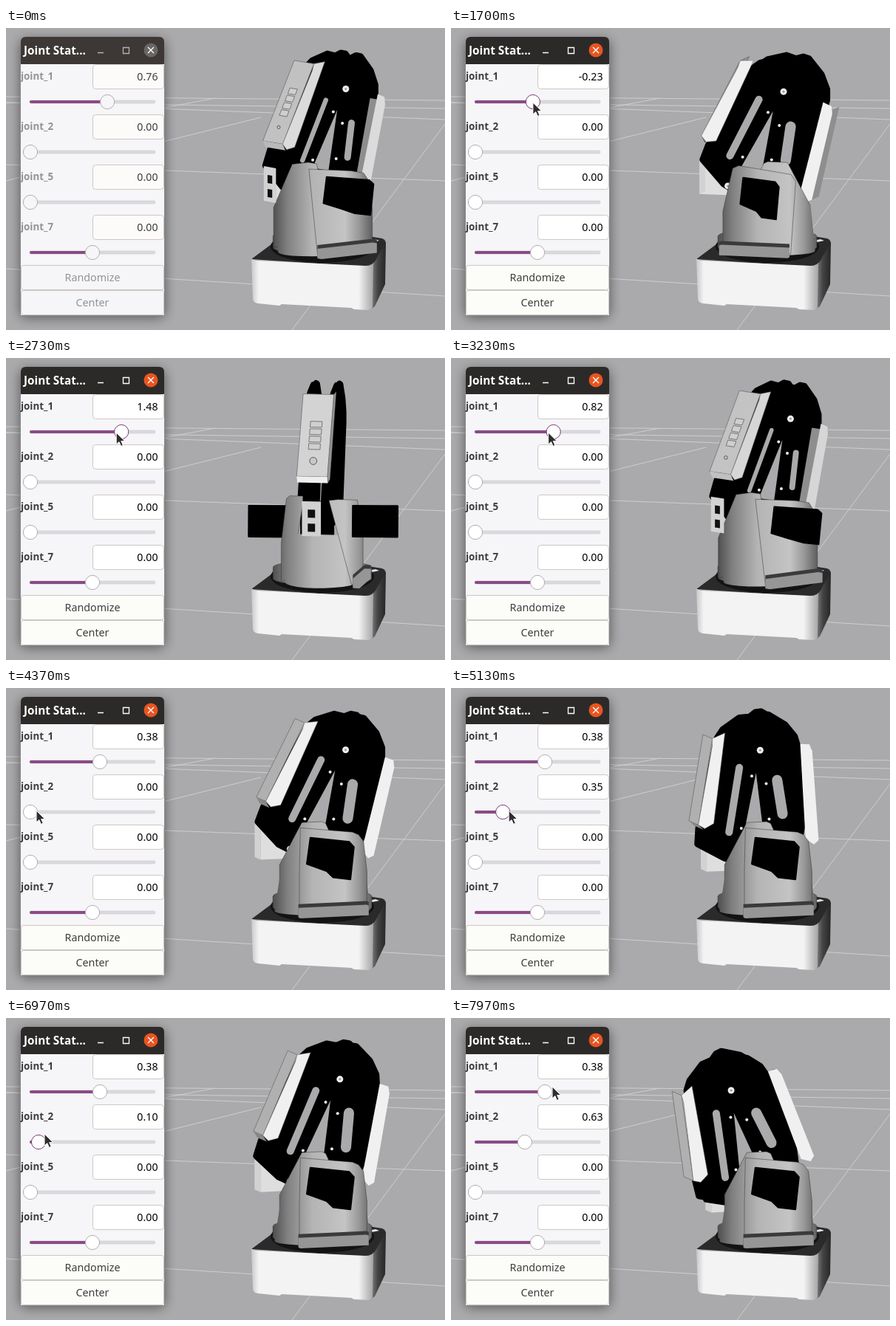
An HTML page for the animation above (8 s loop, 594 px wide and 409 px high).

```html
<!DOCTYPE html>
<html>
<head>
<meta charset="utf-8">
<style>
html, body { margin: 0; width: 100%; height: 100%; overflow: hidden; background: #aaa9ab; }
svg { display: block; width: 594px; height: 409px; }
text { font-family: "Noto Sans", "Open Sans", sans-serif; }
</style>
</head>
<body>
<svg id="stage" viewBox="0 0 594 409">
  <defs>
    <linearGradient id="metal" gradientUnits="userSpaceOnUse" x1="360" x2="497">
      <stop offset="0" stop-color="#4c4c4c"/><stop offset=".15" stop-color="#808080"/>
      <stop offset=".4" stop-color="#b4b4b4"/><stop offset=".72" stop-color="#c4c4c4"/>
      <stop offset=".86" stop-color="#989898"/><stop offset="1" stop-color="#5a5a5a"/>
    </linearGradient>
    <linearGradient id="front">
      <stop offset="0" stop-color="#c8c8c8"/><stop offset=".06" stop-color="#f3f3f3"/>
      <stop offset=".88" stop-color="#f3f3f3"/><stop offset="1" stop-color="#a4a4a4"/>
    </linearGradient>
    <linearGradient id="side">
      <stop offset="0" stop-color="#8e8e8e"/><stop offset=".5" stop-color="#444"/><stop offset="1" stop-color="#262626"/>
    </linearGradient>
    <filter id="blur" x="-20%" y="-20%" width="140%" height="140%"><feGaussianBlur stdDeviation="8"/></filter>
  </defs>
</svg>
<script>
const LOOP = 8000, FLOOR = '#aaa9ab';
const stage = document.getElementById('stage');

function add(parent, tag, attrs, text) {
  const el = document.createElementNS('http://www.w3.org/2000/svg', tag);
  set(el, attrs);
  if (text) el.textContent = text;
  parent.appendChild(el);
  return el;
}
function set(el, attrs) {
  for (const k in attrs) el.setAttribute(k, attrs[k]);
}
const lerp = (a, b, u) => a + (b - a) * u;
const ramp = (t, from, to) => Math.max(0, Math.min(1, (t - from) / (to - from)));
const gray = g => `rgb(${[g, g, g].map(Math.round)})`;

// ---- Motion ----
const JOINT1 = [[1270, .76], [1700, -.23], [1880, -.5], [2100, -.5], [2730, 1.48], [2930, 1.48], [3430, .38]];
const JOINT2 = [[4370, 0], [4770, .2], [5000, .2], [5130, .35], [5450, .55], [5830, .35],
  [6070, .07], [6140, 0], [6270, .07], [6770, .07], [6900, 0], [7330, .63]];

function track(keys, t) {
  const i = Math.max(1, keys.findIndex(k => k[0] >= t)), last = keys[keys.length - 1];
  if (t >= last[0]) return last[1];
  const [t0, a] = keys[i - 1], [t1, b] = keys[i];
  return lerp(a, b, ramp(t, t0, t1));
}
const knob1 = v => 117 + v * 26.5;
const knob2 = v => 33 + v * 106;

// The pointer holds a knob while dragging and travels between knobs otherwise
function pointerAt(t, x1, x2) {
  const grip1 = [x1 - 7 * ramp(t, 2000, 2150), 101];
  const grip2 = [x2 + 8, 166 - 9 * ramp(t, 5130, 5830)];
  const move = (a, b, u) => [lerp(a[0], b[0], u), lerp(a[1], b[1], u)];
  if (t < 1270) return move([160, 386], grip1, ramp(t, 430, 900));
  if (t < 4170) {
    const u = ramp(t, 3670, 4170), [x, y] = move(grip1, grip2, u);
    return [x, y + 220 * Math.sin(Math.PI * u)];
  }
  return move(grip2, [137, 93], ramp(t, 7670, 7970));
}

// ---- Floor and base ----
add(stage, 'rect', { width: 594, height: 409, fill: FLOOR });
add(stage, 'path', {
  d: 'M0 93L594 98M0 101L594 109M0 101L594 124M0 185L594 207M0 326L594 363M387 409L594 130M0 207L345 121M214 108L283 95',
  stroke: '#cfcecf'
});
add(stage, 'path', { d: 'M332 313L371 284L478 280L509 285Q514 287 514 292L498 324Z', fill: '#2b2a2b' });
add(stage, 'path', { d: 'M492 321Q499 319 503 309L514 290L513 347L499 377L492 382Z', fill: 'url(#side)' });
add(stage, 'path', {
  d: 'M332 312Q333 314 340 315L486 322Q495 322 497 318L496 378Q495 382 490 382L471 381L467 379L373 374L370 376L341 373Q334 372 334 366Z',
  fill: 'url(#front)'
});
add(stage, 'path', { d: 'M490 288L500 286L505 288L495 290Z', fill: '#e4e4e4' });
add(stage, 'ellipse', { cx: 428, cy: 296, rx: 70, ry: 22, fill: '#131313' });
const robot = add(stage, 'g');

// ---- Robot: side profiles given depth, turned and projected ----
const PIVOT = [2, 220];
const ARM = [[-16, 55], [-5, 47], [22, 40], [36, 44], [46, 41], [54, 43], [72, 64], [80, 84], [80, 98],
  [55, 198], [42, 222], [-42, 222], [-57, 214], [-87, 182], [-79, 162]];
const GAP = [[13, 112], [-45, 212], [-6, 212]];
const FRONT_COVER = [[-13, 44], [-66, 155], [-80, 157], [-87, 149], [-35, 54], [-32, 45]];
const BACK_COVER = [[84, 97], [96, 102], [97, 112], [68, 230], [60, 233], [51, 222]];
const MOTOR = [[-.85, -1], [.8, -.8], [1, -.55], [.85, 1], [.1, .9], [-.15, .6], [-1, .25]];
const rect = (x0, y0, x1, y1) => [[x0, y0], [x1, y0], [x1, y1], [x0, y1]];

function hull(points) {
  const sorted = [...points].sort((a, b) => a[0] - b[0] || a[1] - b[1]);
  const chain = list => {
    const out = [];
    for (const p of list) {
      while (out.length > 1) {
        const [a, b] = out.slice(-2);
        if ((b[0] - a[0]) * (p[1] - a[1]) > (b[1] - a[1]) * (p[0] - a[0])) break;
        out.pop();
      }
      out.push(p);
    }
    return out.slice(0, -1);
  };
  return [...chain(sorted), ...chain(sorted.reverse())];
}
const shape = (pts, fill, attrs = '') =>
  `<polygon points="${pts.map(p => p.map(n => n.toFixed(1))).join(' ')}" fill="${fill}" stroke-linejoin="round" ${attrs}/>`;
const outline = (color, width) => `stroke="${color}" stroke-width="${width}"`;

function drawRobot(yaw, pitch) {
  const s = Math.sin(yaw - .07), c = Math.cos(yaw - .07);
  const sp = Math.sin(pitch), cp = Math.cos(pitch);
  const sideOn = c > .4;

  const at = (x, y, z) => [428 + x * c + z * s, y + .14 * ((z - 16) * c - x * s)];
  const bend = ([x, y]) => {
    const dx = x - PIVOT[0], dy = y - PIVOT[1];
    return [PIVOT[0] + dx * cp + dy * sp, PIVOT[1] - dx * sp + dy * cp];
  };
  const side = (profile, z) => profile.map(([x, y]) => at(x, y, z));
  const solid = (profile, z0, z1) => [...side(profile, z0), ...side(profile, z1)];
  const strip = (a, b, z) => [at(...a, -z), at(...a, z), at(...b, z), at(...b, -z)];
  const armStrip = (a, b, z) => strip(bend(a), bend(b), z);
  const armSide = (profile, z) => side(profile.map(bend), z);
  const ring = (rx, y, rz) => Array.from({ length: 24 }, (_, i) => {
    const a = i * Math.PI / 12;
    return at(rx * Math.cos(a), y, rz * Math.sin(a));
  });
  const dot = (x, y, z, r, fill, attrs = '') => {
    const [cx, cy] = at(...bend([x, y]), z);
    return `<circle cx="${cx}" cy="${cy}" r="${r}" fill="${fill}" ${attrs}/>`;
  };
  const slot = (a, b, w) => {
    const [p, q] = armSide([a, b], 16);
    return `<path d="M${p}L${q}" stroke="${FLOOR}" stroke-width="${w * (2 * c - .9)}" stroke-linecap="round"/>`;
  };

  // Shoulder motors slide out to both sides as the arm turns to the front
  const slide = 73 * Math.sign(s) * Math.abs(s) ** 1.6;
  const motor = (dir, w) => shape(MOTOR.map(([x, y]) => [
    428 + dir * slide + w * lerp(x, Math.sign(x), s ** 4),
    232 - 11 * s * s + (29 - 8 * s * s) * lerp(y, Math.sign(y), s ** 4)
  ]), '#000', outline('#000', 2));

  // Gripper mount keeps level while the arm carries it
  const [gx, gy] = bend([-50, 217]).map((n, i) => n - [-50, 217][i]);
  const mount = (x, y) => [x + gx, y + gy];
  const gripFace = shape(strip(mount(-92, 182), mount(-92, 229), 13), '#d2d2d2') +
    (s > .5 ? [193, 212].map(y => shape(strip(mount(-92, y), mount(-92, y + 11), 5), '#111')).join('') : '');
  const gripSide = shape(side(rect(-92, 182, -48, 229).map(p => mount(...p)), 13), '#dedede');

  let out = motor(-1, 29 * s * s) + gripSide + (s > .5 ? '' : gripFace);

  for (const z of [-16, 16]) out += shape(armSide(ARM, z), '#000', outline('#000', 8));
  if (sideOn) {
    out += shape(armSide(GAP, 16), FLOOR) + slot([-7, 97], [-48, 175], 10) + slot([38, 132], [31, 178], 14);
    for (const [x, y] of [[28, 85], [-51, 216]]) out += dot(x, y, 16, 4.5, '#eee') + dot(x, y, 16, 1.5, '#999');
    for (const [x, y] of [[6, 114], [22, 131], [-30, 176], [11, 178]]) out += dot(x, y, 16, 2, '#eee');
    out += shape(armStrip([97, 107], [68, 230], 16), '#8e8e8e') + shape(armSide(BACK_COVER, 16), gray(130 + 115 * c));
  }

  // Front cover with its buttons
  const top = [-32, 45], low = [-87, 149];
  const along = u => [lerp(top[0], low[0], u), lerp(top[1], low[1], u)];
  out += shape(armStrip(top, low, 21), gray(160 + 52 * s), outline('#666', .7));
  if (s > .5) {
    for (let i = 0; i < 4; i++)
      out += shape(armStrip(along(.33 + i * .09), along(.4 + i * .09), 8), '#cfcfcf', outline('#777', 1));
    out += dot(...along(.81), 0, 5 * s * s, '#c8c8c8', outline('#555', 1));
  }
  out += shape(armStrip(low, [-82, 158], 21), gray(90 + 150 * Math.max(0, s)));
  out += shape(armSide(FRONT_COVER, 21), gray(130 + 115 * c), outline('#777', .5));

  // Turning column: a skirt, a body and two cheeks around the arm
  const foot = ring(66, 303, 50);
  const edge = outline('#333', .5);
  out += shape(hull(solid(rect(-8, 195, 8, 247), -29, 15)), '#000');
  out += shape(hull([...ring(67, 284, 67), ...ring(67, 299, 67)]), 'url(#metal)', edge);
  out += shape(hull([...solid(rect(-14, 190, 14, 200), -47, -29), ...side(rect(-45, 246, 45, 300), -49)]), 'url(#metal)', edge);
  out += shape(hull([...solid(rect(-42, 246, 46, 260), -49, 48), ...foot]), 'url(#metal)');
  out += shape(hull([...solid([[-36, 188], [38, 197], [45, 206]], 15, 42), ...side(rect(-48, 246, 48, 300), 48)]), 'url(#metal)', edge);
  out += shape(hull(solid(rect(-50, 286, 47, 303), 50, 59)), '#3a3a3a');
  out += shape(hull(solid(rect(-50, 291, 47, 304), 50, 59)), '#969696');
  return out + motor(1, 29 + 10 * s * c) + (s > .5 ? gripFace : '');
}

// ---- Joint window ----
const win = add(stage, 'g');
add(win, 'rect', { x: 19, y: 16, width: 196, height: 376, rx: 8, fill: '#000', opacity: .48, filter: 'url(#blur)' });
// Parts whose colour follows the window focus
const tinted = [];
function tint(el, attr, off, on) {
  tinted.push([el, attr, off, on]);
  return el;
}
const LABEL = [[146, 149, 149], [61, 61, 61]], FIELD = [[252, 251, 250], [255, 255, 255]];
const FACE = [[246, 245, 248], [252, 252, 249]];
add(win, 'rect', { x: 19.5, y: 45, width: 195, height: 344.5, fill: '#f6f5f8', stroke: '#8a888b' });
tint(add(win, 'path', { d: 'M20 49V19Q20 12 27 12H207Q214 12 214 19V49Z' }), 'fill', [61, 56, 54], [44, 42, 41]);
add(win, 'text', { x: 24, y: 36, 'font-size': 15.3, 'font-weight': 700, fill: '#fff' }, 'Joint Stat...');
tint(add(win, 'path', { d: 'M124 33.5H132M158.5 26.5H166.5V34.5H158.5Z', fill: 'none', 'stroke-width': 1.3 }),
  'stroke', [178, 176, 175], [255, 255, 255]);
tint(add(win, 'circle', { cx: 196, cy: 30, r: 9.5 }), 'fill', [105, 102, 101], [233, 84, 32]);
add(win, 'path', { d: 'M192 26L200 34M200 26L192 34', stroke: '#fff', 'stroke-width': 1.4 });

const sliders = ['joint_1', 'joint_2', 'joint_5', 'joint_7'].map((name, i) => {
  const y = 50 + i * 68;
  tint(add(win, 'text', { x: 20, y: y + 20, 'font-size': 13.4, 'font-weight': 700 }, name), 'fill', ...LABEL);
  tint(add(win, 'rect', { x: 117.5, y: y - .5, width: 96, height: 33, rx: 4, stroke: '#cdc7c2' }), 'fill', ...FIELD);
  const value = add(win, 'text', { x: 205.5, y: y + 21, 'font-size': 14.2, 'text-anchor': 'end' });
  tint(value, 'fill', [61, 61, 61], [0, 0, 0]);
  const bar = { x: 32, y: y + 48, height: 4, rx: 2 };
  add(win, 'rect', { ...bar, width: 170, fill: '#dcd9de', stroke: '#cfcad0', 'stroke-width': .6 });
  const fill = add(win, 'rect', { ...bar, fill: '#8a4a86' });
  const knob = tint(add(win, 'circle', { cy: y + 50, r: 9.6 }), 'fill', FACE[0], FIELD[1]);
  return (v, x, active) => {
    value.textContent = v.toFixed(2).replace('-0.00', '0.00');
    set(fill, { width: x - 32 });
    set(knob, { cx: x, stroke: active ? '#7a3d76' : '#b3acb2' });
  };
});
['Randomize', 'Center'].forEach((name, i) => {
  const y = 321.5 + i * 34;
  tint(add(win, 'rect', { x: 20.5, y, width: 193, height: 33, rx: 3, stroke: '#cdc7c2' }), 'fill', ...FACE);
  tint(add(win, 'text', { x: 117, y: y + 21.5, 'font-size': 14.3, 'text-anchor': 'middle' }, name), 'fill', ...LABEL);
});
sliders[2](0, 33);
sliders[3](0, 117);

const pointer = add(stage, 'path', {
  d: 'M0 0V16L3.8 12.6L6.4 18.4L9.2 17.2L6.6 11.6H11.6Z', fill: '#2e2e2e', stroke: '#fff'
});

function draw(t) {
  const j1 = track(JOINT1, t), j2 = track(JOINT2, t);
  // The arm trails its slider slightly
  robot.innerHTML = drawRobot(j1, track(JOINT2, t - 30));

  const focus = ramp(t, 1000, 1200);
  for (const [el, attr, off, on] of tinted)
    el.setAttribute(attr, `rgb(${off.map((a, k) => Math.round(lerp(a, on[k], focus)))})`);

  sliders[0](j1, knob1(j1), t > 1230 && t < 3500);
  sliders[1](j2, knob2(j2), t > 4400 && t < 7600 && !(t > 6470 && t < 6570));
  set(pointer, {
    transform: `translate(${pointerAt(t, knob1(j1), knob2(j2))})`,
    display: t < 430 ? 'none' : 'inline'
  });
}

const start = performance.now();
function tick() {
  draw((performance.now() - start) % LOOP);
  requestAnimationFrame(tick);
}
tick();
</script>
</body>
</html>
```
